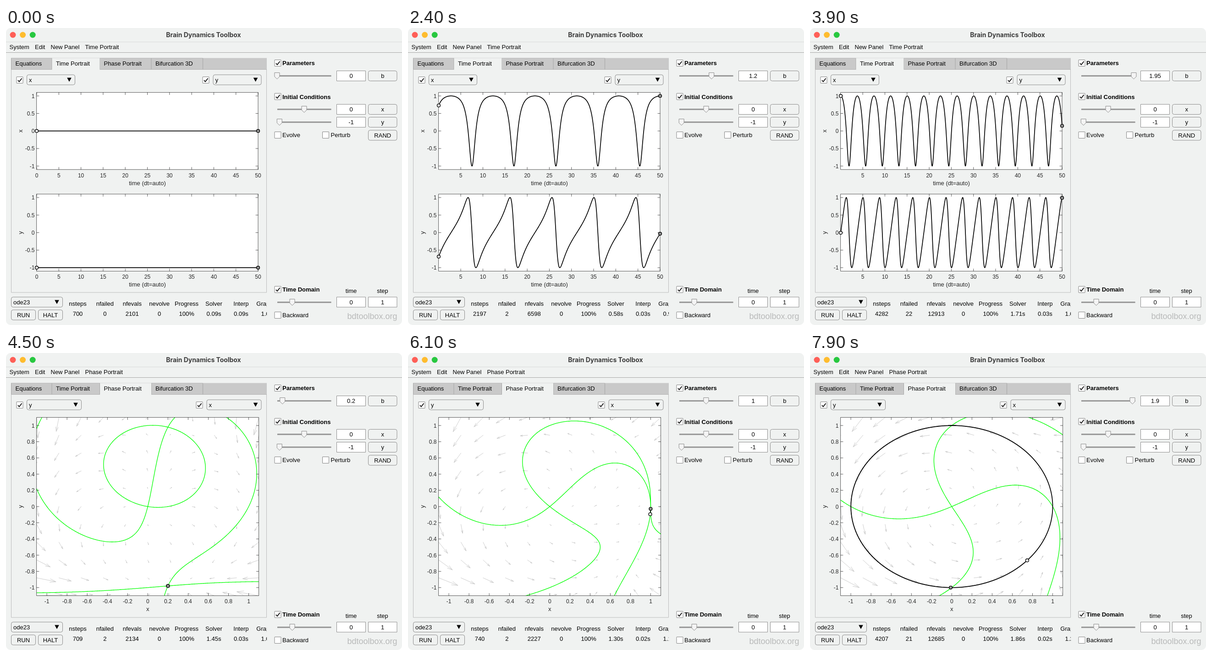
These frames come from a looping animation (864 px wide and 648 px high, 8 s). An HTML page with a canvas:

```html
<!DOCTYPE html>
<html lang="en">
<head>
<meta charset="utf-8">
<title>Brain Dynamics Toolbox</title>
<style>
html, body { margin: 0; width: 100%; height: 100%; overflow: hidden; background: #fff; }
canvas { display: block; width: 864px; height: 648px; }
</style>
</head>
<body>
<canvas id="stage"></canvas>
<script>
const W = 864, H = 648, STEP = 100, COUNT = 80, HALF = 41;
const BG = '#f0f2f1', EDGE = '#8e8e8e', INK = '#262626';
const SANS = '"Liberation Sans", Arial, sans-serif';
const canvas = document.getElementById('stage');
const ctx = canvas.getContext('2d');
const dpr = window.devicePixelRatio || 1;
canvas.width = W * dpr;
canvas.height = H * dpr;

// step, solver time, interpolation time, graphics time
const TIMINGS = [
  [0, 0.09, 0.09, 1.04], [1, 1.0, 0.02, 1.03], [15, 1.05, 0.02, 1.03], [31, 0.22, 0.03, 0.93],
  [39, 1.71, 0.03, 1.04], [53, 1.11, 0.02, 1.03], [61, 1.30, 0.02, 1.12], [79, 1.86, 0.02, 1.22]
];
// b, solver steps, failed steps
const EFFORT = [[0, 700, 0], [0.05, 702, 2], [0.6, 727, 2], [0.75, 733, 2], [1, 740, 2],
  [1.55, 3341, 3], [1.9, 4207, 21], [1.95, 4282, 22], [2, 4356, 23]];
const omega = b => Math.sqrt(Math.max(0, b * b - 1));
const RATE = EFFORT.slice(5).map(([b, n]) => [b, (n - 740) / omega(b)]);

function lookup(table, x, col) {
  if (x <= table[0][0]) return table[0][col];
  for (let i = 1; i < table.length; i++) {
    const p = table[i - 1], q = table[i];
    if (x <= q[0]) return p[col] + (q[col] - p[col]) * (x - p[0]) / (q[0] - p[0]);
  }
  return table[table.length - 1][col];
}

// ---- model: r' = r(1 - r^2), angle' = b - x, started at (0, -1) when t = -20
function state(b, t) {
  const s = t + 20;
  let u;
  if (b > 1) {
    const k = Math.sqrt((b - 1) / (b + 1));
    u = k * Math.tan(omega(b) * s / 2 - Math.atan(1 / k));
  } else if (b === 1) {
    u = -1 / (1 + s);
  } else {
    const m = Math.sqrt((1 - b) / (1 + b));
    const v = (1 - m) / (1 + m) * Math.exp(-Math.sqrt(1 - b * b) * s);
    u = m * (1 + v) / (v - 1);
  }
  const d = 1 + u * u;
  return [(1 - u * u) / d, 2 * u / d];
}
const flowX = (x, y, b) => x * (1 - x * x - y * y) - y * (b - x);
const flowY = (x, y, b) => y * (1 - x * x - y * y) + x * (b - x);
const firstTime = b => b === 0 ? 0 : b <= 1 ? 0.06 : 0.02;

// ---- drawing helpers
function text(s, x, y, { size = 13, align = 'left', color = '#000', weight = 400, family = SANS } = {}) {
  ctx.font = `${weight} ${size}px ${family}`;
  ctx.textAlign = align;
  ctx.fillStyle = color;
  ctx.fillText(s, x, y);
}
const mid = (s, x, y, o) => text(s, x, y, { align: 'center', ...o });

function line(pts, color, width) {
  ctx.beginPath();
  pts.forEach(([x, y]) => ctx.lineTo(x, y));
  ctx.strokeStyle = color;
  ctx.lineWidth = width;
  ctx.stroke();
}
function box(x, y, w, h, r, fill, stroke = EDGE, lw = 1) {
  ctx.beginPath();
  ctx.roundRect(x, y, w, h, r);
  ctx.fillStyle = fill;
  ctx.fill();
  ctx.strokeStyle = stroke;
  ctx.lineWidth = lw;
  ctx.stroke();
}
function dot(x, y, r, fill, stroke) {
  ctx.beginPath();
  ctx.arc(x, y, r, 0, 7);
  ctx.fillStyle = fill;
  ctx.fill();
  if (!stroke) return;
  ctx.strokeStyle = stroke;
  ctx.lineWidth = 1.4;
  ctx.stroke();
}
function check(x, y, on) {
  box(x + 0.5, y + 0.5, 14, 14, 0.5, '#fff', '#858585');
  if (on) line([[x + 3.5, y + 8], [x + 6.3, y + 11.2], [x + 12, y + 3.8]], '#222', 1.9);
}
function button(s, x, y, w) {
  box(x, y, w, 22, 4, BG);
  mid(s, x + w / 2, y + 15.5);
}
function field(s, y) {
  box(721.5, y, 63, 22, 0, '#fff');
  mid(s, 753, y + 15.5);
}
function dropdown(s, x, y, w) {
  box(x, y, w, 22, 4, BG);
  text(s, x + 4.5, y + 15.5);
  const cx = x + w - 12.5, cy = y + 6.5;
  ctx.beginPath();
  ctx.moveTo(cx - 4.8, cy);
  ctx.lineTo(cx + 4.8, cy);
  ctx.lineTo(cx, cy + 8.8);
  ctx.fillStyle = '#000';
  ctx.fill();
}
function slider(x, y) {
  line([[592, y], [709.5, y]], '#8c8c8c', 3);
  line([[592.5, y + 0.2], [709, y + 0.2]], '#b0b0b0', 1);
  ctx.beginPath();
  [[-5.5, -7], [5.5, -7], [5.5, 1.5], [0, 6.8], [-5.5, 1.5]].forEach(([dx, dy]) => ctx.lineTo(x + dx, y + dy));
  ctx.closePath();
  ctx.fillStyle = '#f4f4f4';
  ctx.fill();
  ctx.strokeStyle = '#8c8c8c';
  ctx.lineWidth = 1;
  ctx.stroke();
}

// ---- axes
function axes(x0, y0, x1, y1, xt, yt, px, py, labelY) {
  ctx.fillStyle = '#fff';
  ctx.fillRect(x0, y0, x1 - x0, y1 - y0);
  return () => {
    ctx.strokeStyle = INK;
    ctx.lineWidth = 0.75;
    ctx.strokeRect(x0, y0, x1 - x0, y1 - y0);
    for (const v of xt) {
      const x = px(v);
      line([[x, y0], [x, y0 + 5]], INK, 0.75);
      line([[x, y1], [x, y1 - 5]], INK, 0.75);
      mid(String(v), x, labelY, { size: 12, color: INK });
    }
    for (const v of yt) {
      const y = py(v);
      line([[x0, y], [x0 + 5, y]], INK, 0.75);
      line([[x1, y], [x1 - 5, y]], INK, 0.75);
      text(String(v), 62.5, y + 4.5, { size: 12, align: 'right', color: INK });
    }
  };
}
function sideLabel(s, y) {
  ctx.save();
  ctx.translate(36, y);
  ctx.rotate(-Math.PI / 2);
  mid(s, 0, 0, { color: INK });
  ctx.restore();
}
function clipped(x, y, w, h, draw) {
  ctx.save();
  ctx.beginPath();
  ctx.rect(x, y, w, h);
  ctx.clip();
  draw();
  ctx.restore();
}

function timePlot(name, part, cy, b) {
  const t0 = firstTime(b);
  const px = t => 67 + 483 * (t - t0) / (50 - t0);
  const py = v => cy - 76.5 * v;
  const ticks = [0, 5, 10, 15, 20, 25, 30, 35, 40, 45, 50].filter(t => t >= t0);
  const frame = axes(67, cy - 84.1, 550, cy + 84.1, ticks, [1, 0.5, 0, -0.5, -1], px, py, cy + 101);
  frame();
  const pts = [];
  for (let i = 0; i <= 1600; i++) {
    const t = t0 + (50 - t0) * i / 1600;
    pts.push([px(t), py(state(b, t)[part])]);
  }
  line(pts, '#000', 1.7);
  dot(...pts[0], 3.4, '#fff', '#000');
  dot(...pts[1600], 3.4, '#999', '#000');
  mid('time (dt=auto)', 308.5, cy + 118, { color: INK });
  sideLabel(name, cy);
}

const phX = x => 309.3 + 220.2 * x, phY = y => 335 - 176.8 * y;

function nullcline(f, b) {
  const N = 220, h = 2.2 / N, at = i => -1.1 + h * i;
  let low = [];
  ctx.beginPath();
  for (let j = 0; j <= N; j++) {
    const row = [];
    for (let i = 0; i <= N; i++) row.push(f(at(i), at(j), b) + 1e-9);
    for (let i = 0; j && i < N; i++) {
      const c = [[i, j - 1, low[i]], [i + 1, j - 1, low[i + 1]], [i + 1, j, row[i + 1]], [i, j, row[i]]];
      const hits = [];
      for (let k = 0; k < 4; k++) {
        const p = c[k], q = c[(k + 1) % 4];
        if (p[2] > 0 === q[2] > 0) continue;
        const a = p[2] / (p[2] - q[2]);
        hits.push([at(p[0] + a * (q[0] - p[0])), at(p[1] + a * (q[1] - p[1]))]);
      }
      for (let k = 0; k + 1 < hits.length; k += 2) {
        ctx.moveTo(phX(hits[k][0]), phY(hits[k][1]));
        ctx.lineTo(phX(hits[k + 1][0]), phY(hits[k + 1][1]));
      }
    }
    low = row;
  }
  ctx.strokeStyle = '#0f0';
  ctx.lineWidth = 1.3;
  ctx.stroke();
}

function quiver(b) {
  const arrows = [];
  let top = 0;
  for (let i = 0; i < 11; i++) for (let j = 0; j < 11; j++) {
    const x = -1.1 + 0.22 * i, y = -1.1 + 0.22 * j;
    const u = flowX(x, y, b), v = flowY(x, y, b);
    top = Math.max(top, Math.hypot(u, v));
    arrows.push([x, y, u, v]);
  }
  const s = 0.9 * 0.2 * Math.SQRT2 / top;
  ctx.beginPath();
  for (const [x, y, u, v] of arrows) {
    const ax = phX(x), ay = phY(y), bx = phX(x + s * u), by = phY(y + s * v);
    const dx = bx - ax, dy = by - ay;
    ctx.moveTo(ax, ay);
    ctx.lineTo(bx, by);
    ctx.moveTo(bx - 0.3 * dx - 0.09 * dy, by - 0.3 * dy + 0.09 * dx);
    ctx.lineTo(bx, by);
    ctx.lineTo(bx - 0.3 * dx + 0.09 * dy, by - 0.3 * dy - 0.09 * dx);
  }
  ctx.strokeStyle = '#c0c0c0';
  ctx.lineWidth = 0.8;
  ctx.stroke();
}

function phasePlot(b) {
  const ticks = [-1, -0.8, -0.6, -0.4, -0.2, 0, 0.2, 0.4, 0.6, 0.8, 1];
  const frame = axes(67, 140.5, 551.5, 529.5, ticks, ticks, phX, phY, 545.5);
  const pts = [], t0 = firstTime(b);
  for (let i = 0; i <= 1600; i++) {
    const [x, y] = state(b, t0 + (50 - t0) * i / 1600);
    pts.push([phX(x), phY(y)]);
  }
  clipped(67, 140.5, 484.5, 389, () => {
    quiver(b);
    nullcline(flowX, b);
    nullcline(flowY, b);
  });
  frame();
  line(pts, '#000', 1.7);
  dot(...pts[0], 3.4, '#fff', '#000');
  dot(...pts[1600], 3.4, '#999', '#000');
  mid('x', 309.3, 563, { color: INK });
  sideLabel('y', 335);
}

// ---- window parts
function chrome(phase) {
  ctx.fillStyle = '#fff';
  ctx.fillRect(0, 0, W, H);
  ctx.beginPath();
  ctx.roundRect(0, 0, W, H, 10);
  ctx.fillStyle = BG;
  ctx.fill();
  ['#fe5f57', '#febc2e', '#28c840'].forEach((c, i) => dot(15 + 21.6 * i, 15, 6.5, c));
  mid('Brain Dynamics Toolbox', 431, 19.5, { size: 13.9, weight: 700, color: '#3c3c3c', family: 'Inter, sans-serif' });
  line([[0, 30.5], [W, 30.5]], '#d9dada', 1);
  line([[0, 53.5], [W, 53.5]], '#a8a8a8', 1);
  const view = phase ? 'Phase Portrait' : 'Time Portrait';
  [['System', 7.5], ['Edit', 63], ['New Panel', 97.5], [view, 172.5]].forEach(([s, x]) => text(s, x, 45.5));

  box(11.5, 90.5, 557, 486.5, 0, BG, '#bcbcbc');
  ctx.fillStyle = '#c9c9c9';
  ctx.fillRect(11, 65.5, 558, 25);
  const edges = [11.5, 100, 204.5, 317, 429.5], open = phase ? 2 : 1;
  edges.forEach(x => line([[x, 66], [x, 90]], '#a6a6a6', 1));
  line([[11, 65.8], [429.5, 65.8]], '#b4b4b4', 0.8);
  line([[11, 90.5], [569, 90.5]], '#b4b4b4', 1);
  ctx.fillStyle = BG;
  ctx.fillRect(edges[open] + 0.5, 65.5, edges[open + 1] - edges[open] - 0.5, 26);
  [['Equations', 20.5], ['Time Portrait', 109], ['Phase Portrait', 213.5], ['Bifurcation 3D', 326]]
    .forEach(([s, x]) => text(s, x, 82));

  const w = phase ? 119 : 105;
  check(22.5, 106, true);
  dropdown(phase ? 'y' : 'x', 45.5, 102, w);
  check(phase ? 414.5 : 428.5, 106, true);
  dropdown(phase ? 'x' : 'y', 557 - w, 102, w);
}

function controls(b) {
  const head = { weight: 700 };
  check(585.5, 69, true);
  text('Parameters', 603, 81, head);
  slider(591.4 + 59 * b, 104.5);
  field(String(+b.toFixed(2)), 93.5);
  button('b', 790.5, 93.5, 62.5);

  check(585.5, 142, true);
  text('Initial Conditions', 603, 154.5, head);
  [['x', 0, 177.5], ['y', -1, 205.5]].forEach(([s, v, y]) => {
    slider(650.5 + 53.8 * v, y);
    field(String(v), y - 11);
    button(s, 790.5, y - 11, 62.5);
  });
  check(585.5, 226, false);
  text('Evolve', 603, 238);
  check(690, 226, false);
  text('Perturb', 708.5, 238);
  button('RAND', 790.5, 223, 62.5);

  check(585.5, 563, true);
  text('Time Domain', 603, 575, head);
  mid('time', 753, 578);
  mid('step', 821.5, 578);
  slider(624.5, 598.5);
  field('0', 587);
  box(790.5, 587, 62.5, 22, 0, '#fff');
  mid('1', 821.7, 602.5);
  check(585.5, 619, false);
  text('Backward', 603, 631);
  text('bdtoolbox.org', 853.5, 634.5, { size: 18, align: 'right', color: '#b9baba' });
}

function status(n, b) {
  dropdown('ode23', 11.5, 587, 112);
  button('RUN', 11.5, 615, 53);
  button('HALT', 70.5, 615, 53);
  const steps = Math.round(b > 1 ? 740 + omega(b) * lookup(RATE, b, 1) : lookup(EFFORT, b, 1));
  const failed = Math.round(lookup(EFFORT, b, 2));
  const secs = col => lookup(TIMINGS, n, col).toFixed(2) + 's';
  const cells = [['nsteps', steps], ['nfailed', failed], ['nfevals', 3 * (steps + failed) + 1], ['nevolve', 0],
    ['Progress', '100%'], ['Solver', secs(1)], ['Interp', secs(2)], ['Graphics', secs(3)]];
  clipped(124, 580, 445, 68, () => cells.forEach(([s, v], i) => {
    const x = 156.5 + 59.4 * i;
    mid(s, x, 606);
    mid(String(v), x, 627.5);
  }));
}

function render(n) {
  const phase = n >= HALF;
  const b = (phase ? n - HALF : n) / 20;
  ctx.setTransform(dpr, 0, 0, dpr, 0, 0);
  ctx.lineJoin = 'round';
  chrome(phase);
  controls(b);
  status(n, b);
  ctx.lineCap = 'round';
  if (phase) {
    phasePlot(b);
  } else {
    timePlot('x', 0, 224.7, b);
    timePlot('y', 1, 446.4, b);
  }
  ctx.lineCap = 'butt';
}

let shown = -1;
function tick() {
  const n = Math.floor(performance.now() / STEP) % COUNT;
  if (n !== shown) render(shown = n);
  requestAnimationFrame(tick);
}
tick();
</script>
</body>
</html>
```
